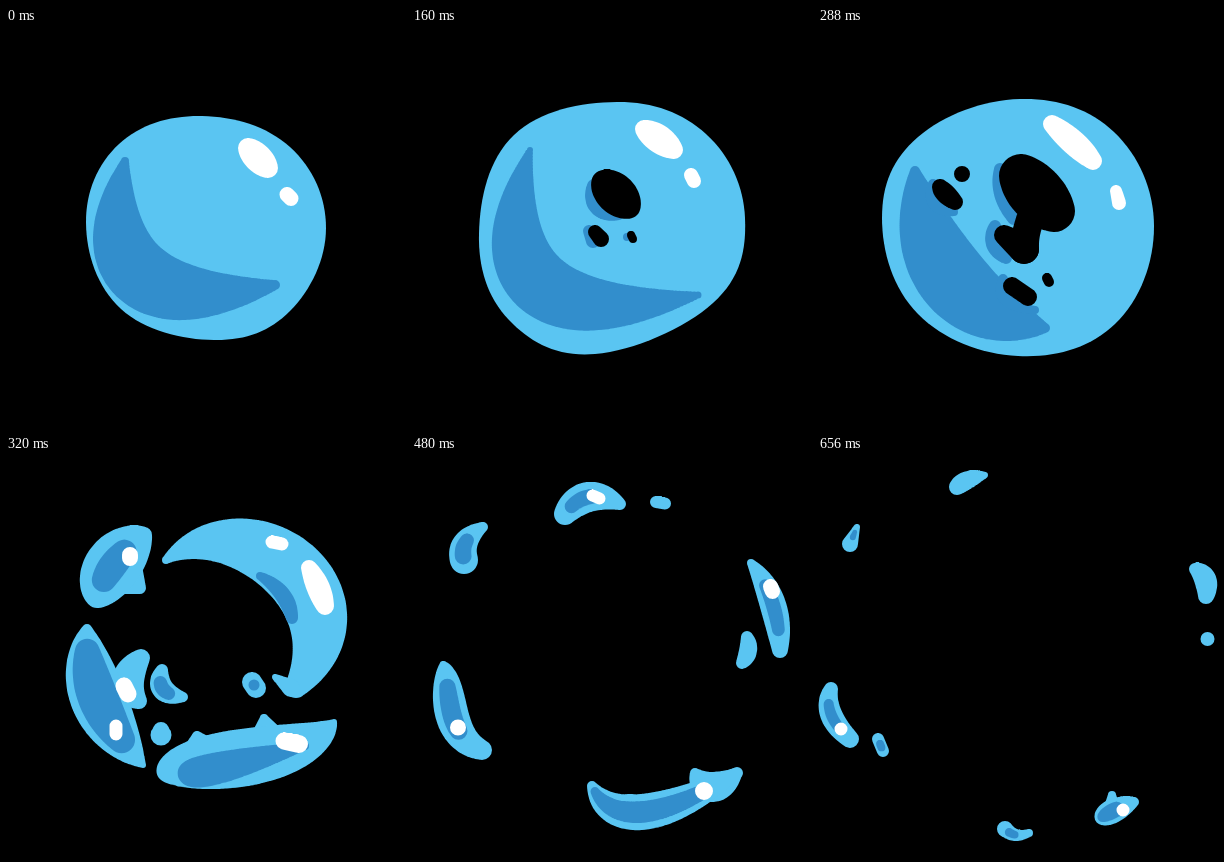
An HTML page with a canvas that plays this animation: 400 by 400 pixels, repeating every 0.72 s.

```html
<!DOCTYPE html>
<html lang="en">
<head>
<meta charset="utf-8">
<title>Bubble burst</title>
<style>
html, body { margin: 0; width: 100%; height: 100%; overflow: hidden; background: #000; }
canvas { display: block; }
</style>
</head>
<body>
<canvas id="stage" width="400" height="400"></canvas>
<script>
const ctx = document.getElementById("stage").getContext("2d");
const LIGHT = "#5ac5f2", DARK = "#328ecc", WHITE = "#fff", BLACK = "#000";
const STEPS = 120;

// Disc [x, y, r] at t in 0..1 on the polynomial through all key discs.
function discAt(discs, t) {
  const u = t * (discs.length - 1);
  const weights = discs.map((_, i) =>
    discs.reduce((w, _, j) => j === i ? w : w * (u - j) / (i - j), 1));
  return [0, 1, 2].map(k => discs.reduce((sum, d, i) => sum + d[k] * weights[i], 0));
}

// Brush stroke swept through the key discs, whole or in part, thinned by scale.
function sweep(color, discs, from = 0, to = 1, scale = 1) {
  ctx.fillStyle = color;
  ctx.beginPath();
  for (let i = 0; i <= STEPS; i++) {
    const [x, y, r] = discAt(discs, from + (to - from) * i / STEPS);
    ctx.moveTo(x + r * scale, y);
    ctx.arc(x, y, Math.max(r * scale, 0), 0, 2 * Math.PI);
  }
  ctx.fill();
}

const brush = color => (...discs) => sweep(color, discs);
const light = brush(LIGHT), dark = brush(DARK), glint = brush(WHITE), hole = brush(BLACK);

// Light piece whose shade is a thinner part of the same stroke.
function shard(from, to, scale, ...discs) {
  sweep(LIGHT, discs);
  sweep(DARK, discs, from, to, scale);
}

// Round closed curve through eight points; 0.1875 makes a regular octagon a circle.
function body(...pts) {
  const at = i => pts[(i + pts.length) % pts.length];
  const handle = (i, sign) =>
    [0, 1].map(k => at(i)[k] + sign * 0.1875 * (at(i + 1)[k] - at(i - 1)[k]));
  ctx.fillStyle = LIGHT;
  ctx.beginPath();
  ctx.moveTo(...pts[0]);
  pts.forEach((_, i) =>
    ctx.bezierCurveTo(...handle(i, 1), ...handle(i + 1, -1), ...at(i + 1)));
  ctx.fill();
}

function whole() {
  body([196, 88], [284, 119], [320, 200], [284, 283], [208, 312], [115, 281], [80, 195], [113, 116]);
  dark([119, 133, 4], [136, 247, 33], [269, 257, 5]);
  glint([242, 120, 10], [252, 130, 14], [262, 140, 10]);
  glint([281, 166.5, 7.5], [285, 170.5, 7.5]);
}

function pierced() {
  body([205, 74], [294, 106], [333, 190], [301, 275], [183, 326], [97, 292], [67, 205], [102, 107]);
  dark([118, 122, 3], [129, 256, 32], [286, 267, 3.5]);
  glint([232, 101, 9], [247, 111, 14], [262, 122, 9]);
  glint([279, 147, 7], [282, 153, 7]);

  dark([182, 158, 7], [187, 178, 10], [207, 187, 5]);
  hole([190, 153, 10], [204, 166, 20], [218, 180, 10]);
  dark([177, 203, 6], [181, 213, 7]);
  hole([183, 204, 7], [189, 211, 8]);
  dark([215, 209, 4]);
  hole([219, 207, 4], [221, 211, 4]);
}

function torn() {
  body([202, 71], [296, 104], [336, 198], [297, 296], [200, 328], [100, 286], [64, 190], [100, 109]);
  dark([97, 143, 5], [136, 252, 36], [227, 300, 5]);
  glint([234, 96, 9], [256, 115, 12.5], [275, 133, 9]);
  glint([298, 163, 6], [301, 175, 7]);

  dark([182, 141, 6], [182, 166, 6], [196, 190, 7]);
  dark([177, 198, 6], [176, 216, 8], [188, 230, 6]);
  hole([203, 148, 22], [219, 166, 28], [236, 183, 21]);
  hole([212, 192, 14], [208, 206, 14], [206, 221, 15]);
  hole([186, 207, 10], [206, 221, 15]);

  dark([115, 156, 5], [118, 175, 8], [136, 184, 4]);
  hole([122, 159, 8], [128, 166, 10], [137, 174, 8]);
  hole([144, 146, 8]);
  dark([185, 251, 5], [188, 272, 6], [217, 282, 4]);
  hole([194, 258, 9], [210, 269, 9]);
  hole([229, 250, 5], [231, 254, 5]);
}

function shattered() {
  light([160, 104, 4], [243, 90, 27], [306, 143, 32], [290, 231, 11]);
  light([269, 221, 3], [285, 232, 9]);
  dark([254, 120, 4], [276, 138, 8], [286, 162, 6]);
  glint([266, 86, 6.5], [276, 88, 6.5]);
  glint([303, 112, 8], [312, 131, 11.5], [319, 150, 9]);

  light([110, 112, 26], [134, 132, 6]);
  shard(.3, .75, .5, [138, 79, 8], [108, 108, 28], [91, 141, 11]);
  glint([124, 99, 8], [124, 102, 8]);

  light([135, 202, 9], [122, 226, 16], [133, 245, 8]);
  shard(.15, .8, .72, [81, 173, 5], [93, 244, 28], [137, 309, 3]);
  glint([118, 230, 8.5], [122, 238, 8.5]);
  glint([110, 270, 6.5], [110, 278, 6.5]);

  shard(.3, .7, .65, [156, 214, 6], [157, 233, 11], [177, 241, 5]);
  light([155, 274, 8], [155, 279, 10.5]);
  shard(.5, .5, .55, [246, 226, 10], [250, 232, 10]);

  light([258, 262, 4], [262, 285, 18]);
  light([191, 280, 5], [196, 300, 20]);
  light([157, 319, 3], [198, 307, 26], [272, 295, 26], [328, 266, 3]);
  dark([183, 316, 7], [208, 313, 16], [299, 290, 4]);
  glint([278, 285, 8.5], [293, 288, 9]);
}

function flying() {
  light([97, 105, 18], [113, 119, 5]);
  shard(.35, .8, .6, [120, 72, 5], [97, 103, 21], [80, 134, 12]);
  glint([103, 93, 8], [103, 97, 8]);
  shard(.4, .65, .45, [103, 144, 6], [97, 162, 12], [98, 177, 12]);

  light([75, 215, 14], [91, 211, 4]);
  shard(.1, .75, .62, [61, 207, 16], [75, 248, 25], [112, 311, 4]);
  glint([89, 261, 8], [91, 269, 8]);
  shard(.5, .5, .65, [124, 211, 4], [118, 227, 9], [126, 241, 10]);
  glint([121, 230, 5.5], [123, 234, 5.5]);

  light([200, 80, 14], [213, 94, 5]);
  shard(.2, .5, .6, [165, 103, 14], [194, 69, 24], [264, 67, 5]);
  glint([216, 62, 8]);
  light([288, 79, 7], [300, 87, 6]);

  light([303, 148, 9], [312, 175, 12]);
  light([314, 104, 4], [331, 173, 27], [300, 244, 5]);
  dark([323, 142, 10], [321, 165, 17], [320, 208, 6]);
  glint([335.5, 147, 10], [335.5, 159, 10]);
  glint([343, 188, 8.5]);

  light([268, 289, 5], [275, 305, 15]);
  shard(.15, .5, .45, [176, 324, 10], [222, 334, 18], [279, 315, 26], [333, 287, 3]);
  glint([290, 313, 10], [297, 309, 10]);
}

function shrinking() {
  shard(.45, .9, .6, [71, 71, 5], [54, 86, 12], [52, 104, 14]);
  shard(.15, .55, .5, [153, 58, 11], [177, 41, 15], [208, 48, 6]);
  glint([180.5, 39.5, 6], [187.5, 42.5, 6]);
  light([244, 46, 6], [253, 47.5, 6]);

  shard(.3, .8, .55, [339, 107, 4], [360, 146, 13], [368, 194, 8]);
  glint([358.5, 130.5, 7.5], [360.5, 135.5, 7.5]);
  light([335, 181, 6], [336, 195, 9], [330, 207, 6]);

  shard(.28, .72, .58, [31, 208, 3], [36, 236, 15], [44, 270, 16], [70, 294, 10]);
  glint([46, 271.5, 8]);

  light([283, 317, 5], [300, 331, 15], [324, 318, 6]);
  shard(.05, .82, .6, [180, 330, 5], [230, 356, 18], [325, 317, 6]);
  glint([292, 335, 9]);
}

function droplets() {
  shard(.3, .6, .5, [39, 71, 3], [32, 88, 8]);
  light([139, 31, 8], [150, 24, 9], [167, 19, 3]);
  light([377, 113, 6], [387, 123, 11], [388, 140, 8]);
  light([389.5, 183, 7]);

  shard(.3, .75, .5, [13, 233, 7], [13, 258, 11], [32, 283, 9]);
  glint([23, 273, 6.5]);
  shard(.4, .7, .65, [60, 283, 6], [65, 295, 6]);

  shard(.2, .45, .6, [187, 373, 8], [198, 379, 6], [211, 377, 4]);
  light([294, 339, 4], [294, 352, 8]);
  shard(.1, .6, .65, [283, 362, 6], [295, 355, 12], [316, 346, 5]);
  glint([305, 354, 6.5]);
}

// The first and last poses hold for two beats of 80 ms.
const beats = [whole, whole, pierced, torn, shattered, flying, shrinking, droplets, droplets];
const start = performance.now();

function draw() {
  const beat = Math.floor((performance.now() - start) / 80) % beats.length;
  ctx.fillStyle = BLACK;
  ctx.fillRect(0, 0, 400, 400);
  beats[beat]();
  requestAnimationFrame(draw);
}
draw();
</script>
</body>
</html>
```
